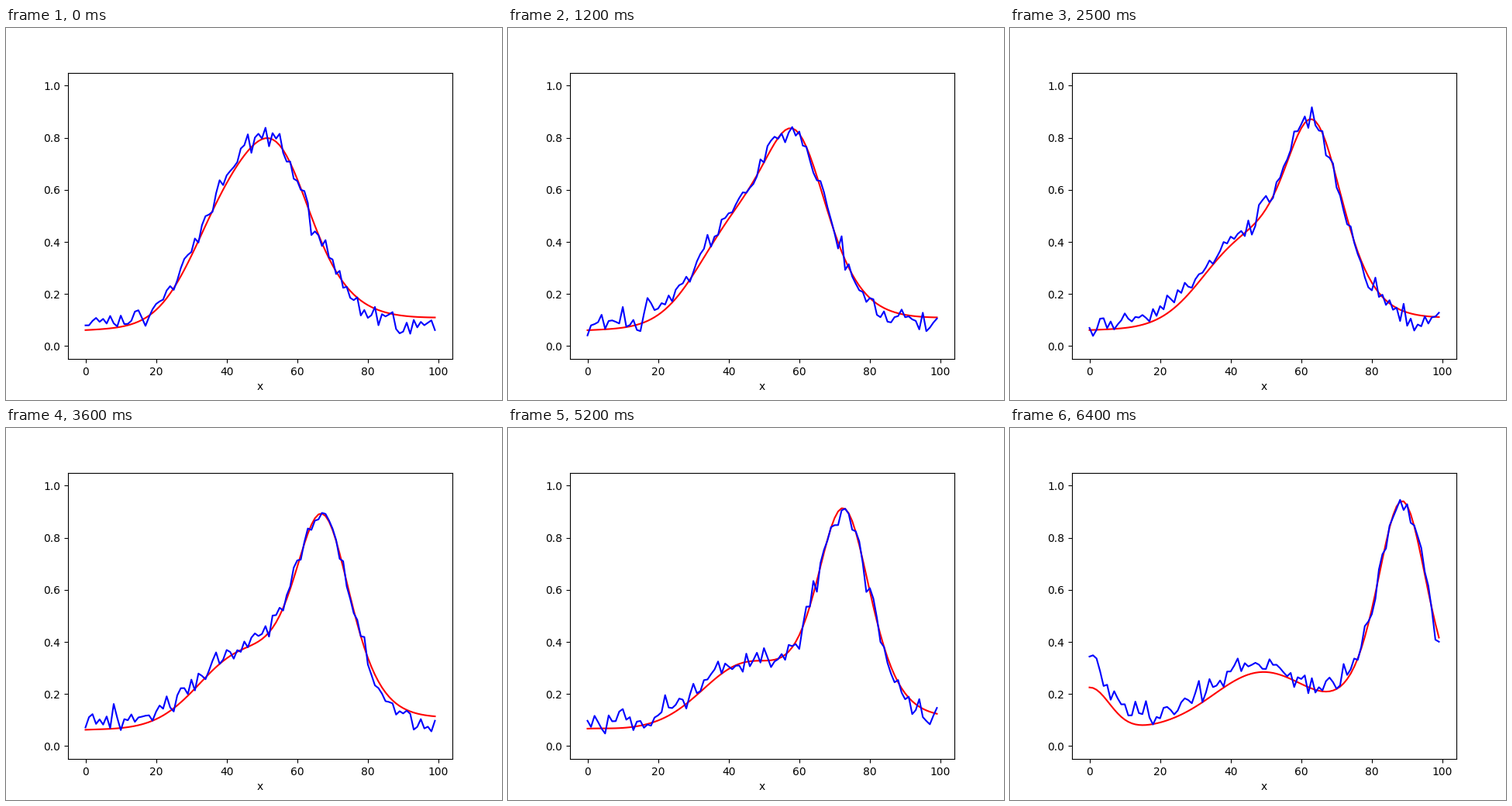
Write a matplotlib script that moves like this. It is 640 px wide and 480 px high and loops after 6500 ms.

```python
import numpy as np
import matplotlib.pyplot as plt
from matplotlib.animation import FuncAnimation

FRAMES = 65
INTERVAL = 100
x = np.arange(100)


def gauss(center, width):
    return np.exp(-0.5 * ((x - center) / width) ** 2)


def bump_center(frame):
    """Steady drift to the right with a quick run at the end."""
    sprint = max(0, (frame - 57) / 7)
    return 55 + 0.337 * frame + 12 * sprint ** 2


def edge_lift(center):
    return 0.166 * np.exp((center - 88.6) / 5)


def smooth_curve(center):
    """Moving bump, slow shoulder and left edge on a slightly rising floor."""
    d = center - 55
    height = 0.845 - 0.28 * np.exp(-d / 9)
    width = 9.5 + 4.5 * np.exp(-d / 10)
    bump = height / np.cosh((x - center) / width) ** 2

    shoulder_height = 0.19 + 0.145 * np.exp(-d / 13)
    shoulder = shoulder_height * gauss(40 + 0.26 * d, 10.5 + 0.09 * d)

    edge = edge_lift(center) * gauss(0, 5.6)
    return 0.06 + 0.00046 * x + bump + shoulder + edge


def noisy_curve(frame, center):
    rng = np.random.default_rng(700 + frame)
    bias = 0.026 * np.cos(np.pi * (x - 20) / 80)
    bias += edge_lift(center) * (0.1 + 0.65 * np.exp(-x / 4))
    return smooth_curve(center) + bias + rng.normal(0, 0.022, x.size)


fig, ax = plt.subplots(figsize=(6.4, 4.8), dpi=100)
red, = ax.plot([], [], "r")
blue, = ax.plot([], [], "b")
ax.set_xlim(-4.95, 103.95)
ax.set_ylim(-0.05, 1.05)
ax.set_xlabel("x")


def update(frame):
    center = bump_center(frame)
    red.set_data(x, smooth_curve(center))
    blue.set_data(x, noisy_curve(frame, center))
    return red, blue


anim = FuncAnimation(fig, update, frames=FRAMES, interval=INTERVAL,
                     repeat=True, repeat_delay=0)
plt.show()
```
